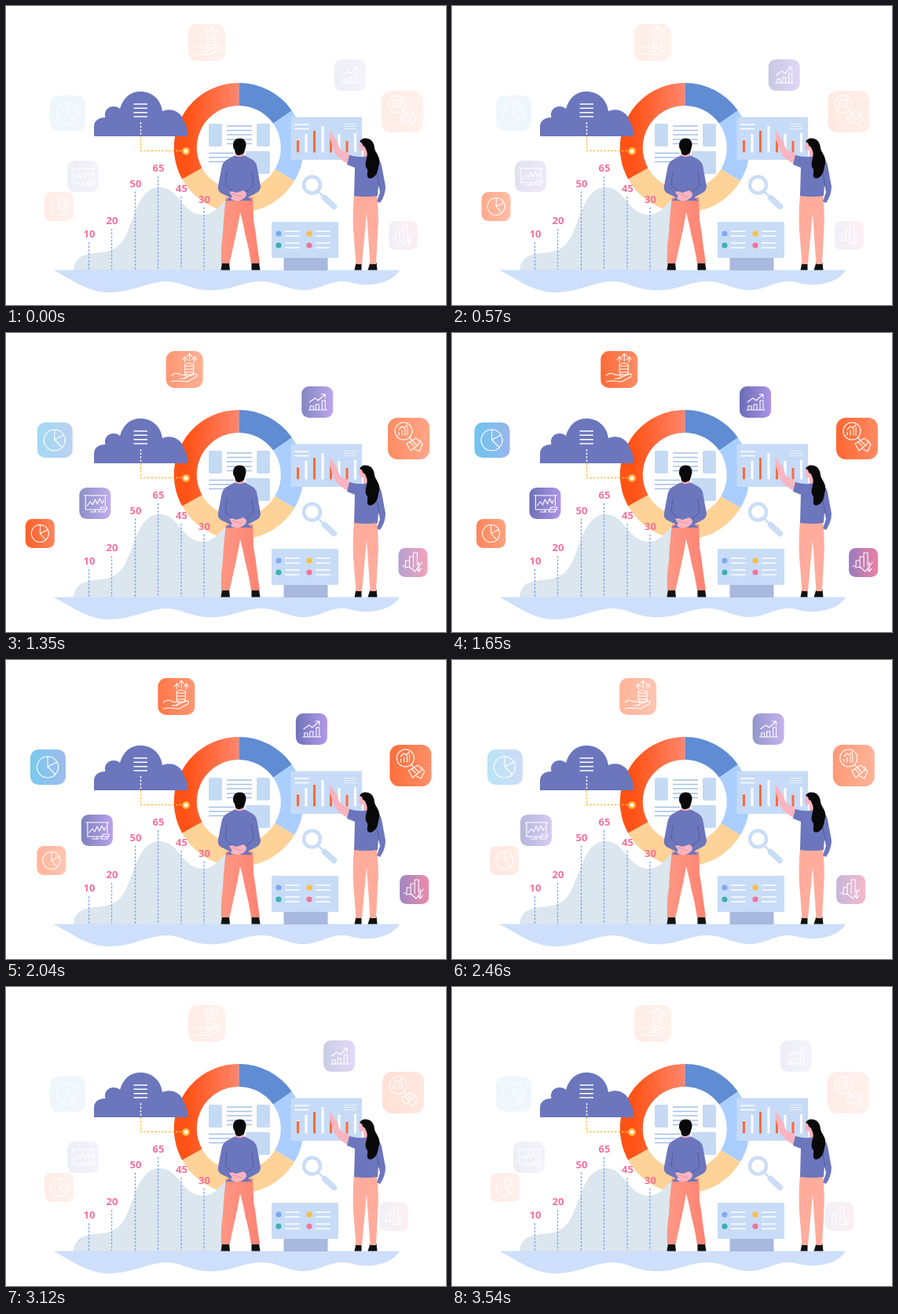
Animation of 560x381 px, one loop 3570 ms. Source, as an HTML page:

```html
<!DOCTYPE html>
<html lang="en">
<head>
<meta charset="utf-8">
<title>Data analysis</title>
<style>
  html, body { margin: 0; width: 100%; height: 100%; overflow: hidden; background: #fff; }
  svg { display: block; width: 560px; height: 381px; }
  .labels { font: bold 13px "Open Sans", "Noto Sans", sans-serif; fill: #f4719b; text-anchor: middle; }
  .icon path { fill: none; stroke: #fff; stroke-width: 1.1; stroke-linecap: round; stroke-linejoin: round; }
  .white { stroke: #fff; fill: none; }
</style>
</head>
<body>
<svg viewBox="0 0 560 381">
  <defs>
    <linearGradient id="orange"><stop stop-color="#ff551a"/><stop offset="1" stop-color="#ff7d50"/></linearGradient>
    <linearGradient id="blue"><stop stop-color="#54bbeb"/><stop offset="1" stop-color="#86a9e8"/></linearGradient>
    <linearGradient id="purple"><stop stop-color="#5c61af"/><stop offset="1" stop-color="#a88be6"/></linearGradient>
    <linearGradient id="pink"><stop stop-color="#8a6ab6"/><stop offset="1" stop-color="#ec7094"/></linearGradient>
    <linearGradient id="ring"><stop offset=".2" stop-color="#ff5216"/><stop offset="1" stop-color="#ff866c"/></linearGradient>
    <linearGradient id="trousers"><stop stop-color="#ff9784"/><stop offset="1" stop-color="#ff8373"/></linearGradient>
  </defs>

  <g id="icons"></g>

  <!-- ring chart -->
  <g id="donut"></g>
  <path fill="#c5daf4" d="M260 150h13q2 0 2 2v25q0 2-2 2h-13q-2 0-2-2v-25q0-2 2-2zM321 150h13q2 0 2 2v25q0 2-2 2h-13q-2 0-2-2v-25q0-2 2-2zM305 185h29q2 0 2 2v25q0 2-2 2h-29z"/>
  <path stroke="#a5c0e6" stroke-width="1.4" d="M281 153h32M281 158.500h32M281 164h32M281 170h32M281 175.500h32M258 187.500h32M258 193h32M258 198.500h32"/>

  <!-- area chart -->
  <path fill="#dbe6ee" d="M86 337C87 323 95 318 106 316C121 313 136 316 148 300C163 279 166 231 196 231C220 231 223 265 250 266C267 266 273 250 284 244V337z"/>
  <path id="guides" stroke="#78a2ee" stroke-width="1.3" stroke-dasharray="2.6 2"/>
  <g class="labels" id="labels"></g>

  <!-- cloud -->
  <path fill="#6b76bd" d="M112 166V154C112 146 118 142 126.500 142C124 134 130 128 137 128Q142 128 145 131C149 117 158 109 171 109C186 109 197 119 199 134C212 129 224 136 226 147Q231 152 231 166z"/>
  <path class="white" stroke-width="1.5" d="M162.500 125h17.500M162.500 130.300h17.500M162.500 135.700h17.500M162.500 141h17.500"/>
  <path class="white" stroke-width="1.4" stroke-dasharray="2.5 2" d="M171.500 148v18"/>
  <path fill="none" stroke="#ffbd4c" stroke-width="1.4" stroke-dasharray="2.5 2" d="M171.500 166v18.500H224"/>
  <circle cx="229" cy="185" r="3.700" fill="#fff" stroke="#ffb640" stroke-width="2.600"/>

  <!-- ground -->
  <path fill="#cddffb" d="M60 336.500H501C493 350 474 356 454 355C440 354 436 350 424 351C406 353 396 363 375 362C354 360 341 349 320 351C298 353 282 364 256 362C233 361 222 350 202 351C180 352 160 365 130 365C101 364 82 347 60 336.500z"/>

  <!-- bar panel -->
  <rect x="362.500" y="141.500" width="90.500" height="54.500" rx="1" fill="#c6dbf7"/>
  <path class="white" stroke-width="1.500" d="M367 151h18.500M367 156.500h18.500"/>
  <path class="white" stroke-dasharray="1.500 1" d="M430 150.500h16M430 153.500h16M430 156.500h16"/>
  <path class="white" stroke-width="3" d="M371.500 170v16.500M382 163v23.500M403 153v33.500M424 163v23.500M444.500 162v24.500"/>
  <path stroke="#ff693a" stroke-width="3" d="M371.500 171v15.500M392.500 159v27.500M413.500 165v21.500M434 172v14.500"/>

  <!-- legend box -->
  <path fill="#a8b8de" d="M353.500 320h56v17h-56z"/>
  <rect x="338" y="275" width="85" height="46" rx="1" fill="#c8dcf7"/>
  <path class="white" stroke-width="1.500" d="M355 287h18.500M355 293h18.500M394 287h18.500M394 293h18.500M355 302h18.500M355 308h18.500M394 302h18.500M394 308h18.500"/>
  <circle cx="347" cy="290" r="3.600" fill="#7faaf0"/><circle cx="386" cy="290" r="3.600" fill="#ffbd41"/>
  <circle cx="347" cy="305" r="3.600" fill="#3cb0ae"/><circle cx="386" cy="305" r="3.600" fill="#f4719b"/>

  <!-- magnifier -->
  <g fill="none" stroke="#cbddf6">
    <circle cx="389.500" cy="228" r="10.500" stroke-width="4.500"/>
    <path stroke-width="2.500" d="M397 236l7 7"/>
    <path stroke-width="7.500" stroke-linecap="round" d="M405.500 244.500l12 11"/>
  </g>

  <!-- man -->
  <path fill="#111" d="M275 327h9l1 9.500h-11.500zM312.500 327h9.500l1.500 9.500h-11z"/>
  <path fill="url(#trousers)" d="M280 244H314Q315 262 315 273Q318 288 319 300L323 328H312Q309 308 305 294Q302 277 298 263Q295 281 292 294L284.500 328H274Q273 308 276 290Q277 266 280 244z"/>
  <path fill="#f7adb7" d="M292 183h11v13h-11z"/>
  <path fill="#6b76bd" d="M291 190.500Q297 194 304 190.500L314 196Q319 199 320 208L324 230Q324 235 319 238L308 244L314 248H279L285 244L273 238Q269 235 270 229L274 208Q275 200 280 196.500z"/>
  <path fill="none" stroke="#525ca2" d="M281 211l-2 17 9 8M313 211l2 18-10 8"/>
  <path fill="#f9b4bf" d="M284 237Q288 235 293 238L302 235Q308 238 305 243Q298 251 288 247Q284 244 288 243z"/>
  <path fill="none" stroke="#e896a8" d="M287 239l13 4"/>
  <path fill="#090909" d="M289 177Q289 168.500 298 168.500Q306 169 305.500 178L303 187Q297 193 292 188L291 183Q289 182 289 177z"/>

  <!-- woman -->
  <path fill="#111" d="M445.500 327h7v9.500h-9zM463.500 327h8l1 9.500h-12z"/>
  <path fill="#ffac9c" d="M443 240H472Q475 268 473 290L471 329H463.500L459 264L453 329H445.500L442 285Q441 260 443 240z"/>
  <path fill="#f8b5c1" d="M411.500 159Q415 161 417 166L422 173Q423 179 426 183L440 191L437 202Q424 196 418 187L412 169z"/>
  <path fill="#f8b5c1" d="M451 171Q448 178 450 183Q453 186 455 183V194H464V172z"/>
  <path fill="#6b76bd" d="M437 190Q450 194 462 191Q475 191 478 203L483 230Q483 241 476 251L472 249L476 237L474 228L473 242Q459 244 443 242L444 206L434 202z"/>
  <path fill="none" stroke="#525ca2" d="M472 212l3 18"/>
  <path fill="#090909" d="M450 173Q453 167 461 169Q468 171 469 181C470 187 477 192 475 201C473 207 474 216 465 219.500C457 221 461 212 460 208C454 201 462 192 459 185Q457 178 454 178Q454 174 450 173z"/>
</svg>

<script>
const LOOP = 3570, STEP = 30;
const byId = id => document.getElementById(id);

// Ring segments: start angle, end angle, colour
const OUTER = 82.5, INNER = 53.5;
const onRing = (deg, r) => {
  const a = deg * Math.PI / 180;
  return `${296.3 + r * Math.sin(a)} ${180.5 - r * Math.cos(a)}`;
};
byId('donut').innerHTML = '<circle cx="296.3" cy="180.5" r="54" fill="#fff"/>' + [
  [0, 55, '#5f8cd3'], [55, 121, '#a9ceff'], [121, 241, '#ffd298'], [241, 360, 'url(#ring)']
].map(([from, to, fill]) =>
  `<path fill="${fill}" d="M${onRing(from, OUTER)}A${OUTER} ${OUTER} 0 0 1 ${onRing(to, OUTER)}L${onRing(to, INNER)}A${INNER} ${INNER} 0 0 0 ${onRing(from, INNER)}z"/>`
).join('');

// Chart values: number, x, label baseline
const values = [[10, 105.5, 295], [20, 134.5, 278], [50, 164.5, 230.5], [65, 193.5, 211], [45, 223, 237], [30, 252, 250.5]];
byId('guides').setAttribute('d', values.map(([, x, y]) => `M${x} ${y + 6}V336`).join(''));
byId('labels').innerHTML = values.map(([n, x, y]) => `<text x="${x + .5}" y="${y}">${n}</text>`).join('');

// Each tile slides from x[0] to x[1] and back to x[2]
const tiles = [
  { x: [232, 182, 232], y: 23, size: 47, start: 763, end: 2859, fill: 'orange',
    glyph: 'M7 31q5-5 11-1l7 1q3 2-1 4h-6M24 34l13-5q4 1 1 4l-11 6-13-1-7 1M24 19h11M24 23h11M24 27h11M24 17v12q6 3 11 0v-12q-6-3-11 0M24 14v-5M21 11l3-4 3 4M30 13v-8M27 7l3-4 3 4M36 14v-5M33 11l3-4 3 4' },
  { x: [56, 23, 56], y: 114, size: 45, start: 911, end: 2790, fill: 'blue',
    glyph: 'M22 9a13.500 13.500 0 1 0 .1 0V22L32 32M22 22l12-6' },
  { x: [78, 101, 78], y: 197, size: 40, start: 450, end: 2880, fill: 'purple',
    glyph: 'M25 28H8V10h25v13M6 10h29M10 23l4-5 3 4 3-7 3 6 3-7 3 6 2-4M14 31h8M20 28v3M27 25h8v3h-8zM25 28h8v3h-8z' },
  { x: [418, 361, 418], y: 68, size: 40, start: 120, end: 3540, fill: 'purple',
    glyph: 'M9 30h23M11 30v-5h4v5M18 30v-7h4v7M26 30V18h4v12M10 20l7-5 4 3 9-8M25 10h5v5' },
  { x: [487, 508, 475], y: 274, size: 37, start: 690, end: 2955, fill: 'pink',
    glyph: 'M5 23h4v-7h5v9M14 23V11h5v13M19 18V6h5v16M8 25l6-1 7 6 9-12M26 18v11M23 26l3 4 3-4' },
  { x: [49, 23, 49], y: 237, size: 37, start: 30, peak: 1265, end: 2500, fill: 'orange',
    glyph: 'M18.500 7.500a11 11 0 1 0 .1 0V18.500L26 27M18.500 18.500l10-5' },
  { x: [478, 490.5, 478], y: 108, size: 53, start: 540, end: 3240, fill: 'orange',
    glyph: 'M31 17a11 11 0 1 1-22 0a11 11 0 1 1 22 0M14 22v-4M18 22v-6M22 22v-8M25 22V12M14 15l4-4 3 2 4-4M27 25l5 5M24 33l12-7 5 6-12 10zM28 31l5 5M31 29l5 5M40 28l4 6-4 9-6-3' }
];
byId('icons').innerHTML = tiles.map(({ size, fill, glyph }) =>
  `<g class="icon"><rect width="${size}" height="${size}" rx="${size * .23}" fill="url(#${fill})"/><path d="${glyph}"/></g>`
).join('');
const nodes = byId('icons').children;

const clamp = v => Math.max(0, Math.min(1, v));

function draw() {
  const t = Math.floor(performance.now() % LOOP / STEP) * STEP;
  tiles.forEach(({ x: [from, far, back], y, start, peak = 1800, end }, i) => {
    const rising = t < peak;
    const out = clamp(rising ? (t - start) / (peak - start) : (end - t) / (end - peak));
    const rest = rising ? from : back;
    nodes[i].setAttribute('transform', `translate(${rest + (far - rest) * out} ${y})`);
    nodes[i].setAttribute('opacity', .1 + .9 * out);
  });
  requestAnimationFrame(draw);
}
draw();
</script>
</body>
</html>
```
